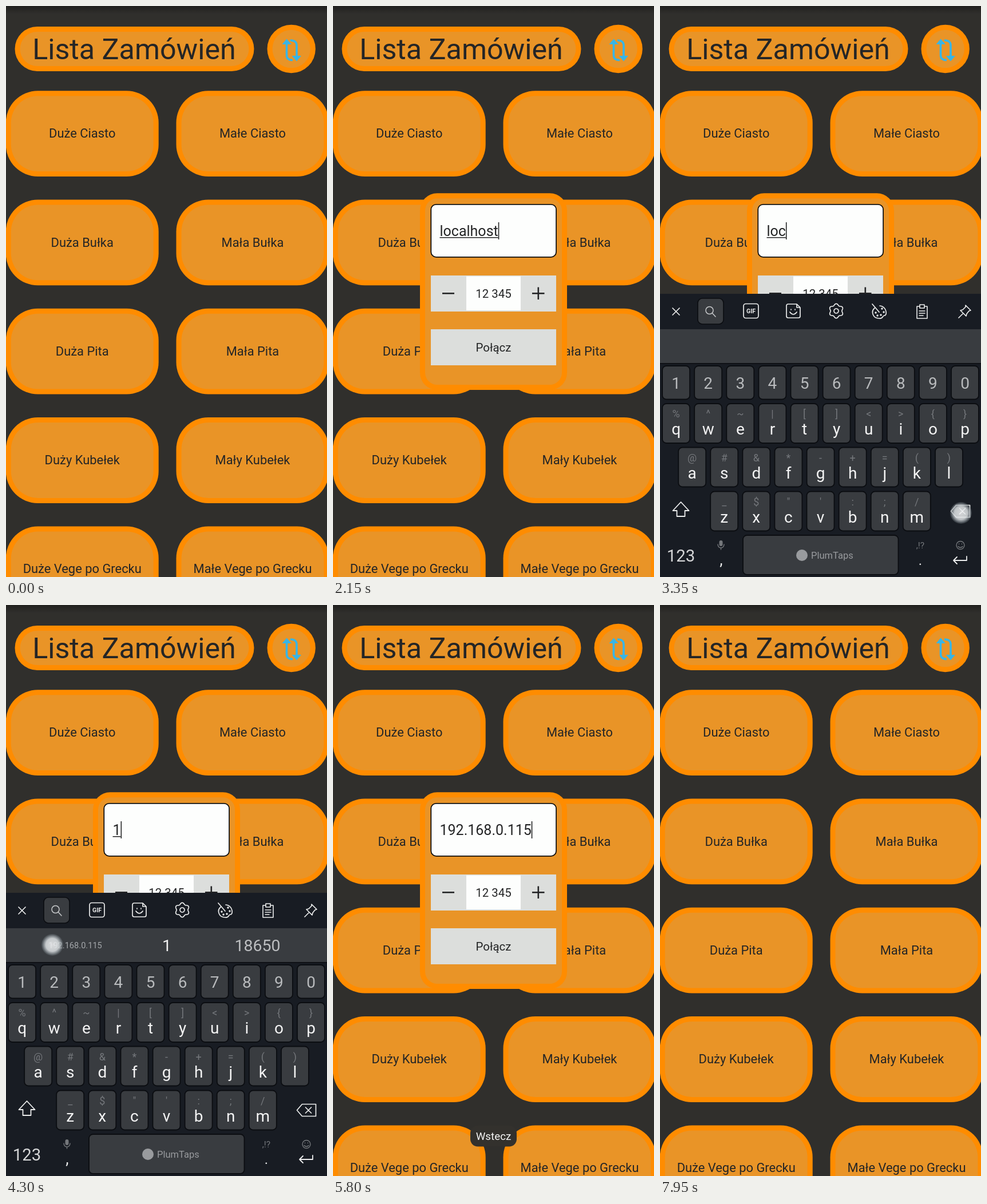
An HTML page with a canvas that plays this animation: 561x998 px, repeating every 8000 ms.

```html
<!DOCTYPE html>
<html lang="pl">
<head>
<meta charset="utf-8">
<style>
html, body { margin: 0; width: 100%; height: 100%; overflow: hidden; background: #302f2c; }
canvas { display: block; width: 100%; height: 100%; }
</style>
</head>
<body>
<canvas id="stage" width="561" height="998"></canvas>
<script>
const W = 561, H = 998, LOOP = 8000, STEP = 50;
const ctx = document.getElementById('stage').getContext('2d');
const INK = '#242526', KEY = '#393c40', EDGE = '#0b0d11', PALE = '#eceded', DIM = '#74777b';

const OPEN = 750, FOCUS = 2050, KB_IN = 2200, KB_OUT = 5600, CLOSE = 6950;
const PICK = 4400, TYPED = 3850;
const TOAST_IN = 5400, TOAST_OUT = 6200;

// start, end, from x, from y, to x, to y, opacity
const touches = [
  [550, 700, 498, 75, 498, 75, .85],
  [1950, 2100, 262, 394, 262, 394, .85],
  [2750, 3600, 526, 886, 526, 886, .85],
  [3750, 3900, 29, 660, 29, 660, .85],
  [4200, 4350, 81, 594, 81, 594, .85],
  [5150, 5400, 557, 886, 498, 886, .5],
  [6750, 6900, 281, 597, 281, 597, .85]
];

function box(x, y, w, h, r, fill, stroke, lw = 2) {
  ctx.beginPath();
  ctx.roundRect(x, y, w, h, r);
  if (fill) { ctx.fillStyle = fill; ctx.fill(); }
  if (stroke) { ctx.strokeStyle = stroke; ctx.lineWidth = lw; ctx.stroke(); }
}

function text(s, x, y, size, color, align = 'center', weight = 400) {
  ctx.font = `${weight} ${size}px Roboto, sans-serif`;
  ctx.textAlign = align;
  ctx.fillStyle = color;
  ctx.fillText(s, x, y);
}

function icon(path, x, y, color = PALE, lw = 1.7) {
  ctx.save();
  ctx.translate(x, y);
  ctx.strokeStyle = color;
  ctx.lineWidth = lw;
  ctx.lineCap = ctx.lineJoin = 'round';
  ctx.stroke(new Path2D(path));
  ctx.restore();
}

function dot(x, y, r, color) {
  ctx.beginPath();
  ctx.arc(x, y, r, 0, 7);
  ctx.fillStyle = color;
  ctx.fill();
}

function panel(x, y, w, h, r) {
  box(x, y, w, h, r, '#ff8c00');
  box(x + 9, y + 9, w - 18, h - 18, r - 9, '#e99427');
}

function drawList() {
  ctx.fillStyle = '#302f2c';
  ctx.fillRect(0, 0, W, H);
  const shade = ctx.createLinearGradient(0, 0, 0, 14);
  shade.addColorStop(0, 'rgba(0,0,0,.3)');
  shade.addColorStop(1, 'rgba(0,0,0,0)');
  ctx.fillStyle = shade;
  ctx.fillRect(0, 0, W, 14);

  panel(15.5, 36, 418, 78, 39);
  text('Lista Zamówień', 224, 93, 50.2, INK);
  panel(456.5, 32.8, 84.4, 84.4, 42.2);
  drawSwap();

  const items = ['Ciasto', 'Bułka', 'Pita', 'Kubełek', 'Vege po Grecku'];
  const sizes = [['Duże', 'Małe'], ['Duża', 'Mała'], ['Duża', 'Mała'], ['Duży', 'Mały'], ['Duże', 'Małe']];
  items.forEach((item, row) => sizes[row].forEach((size, col) => {
    const x = col * 297.8, y = 148.2 + row * 190.3;
    panel(x - .3, y, 267, 149.8, 56);
    text(`${size} ${item}`, x + 133.2, y + 82, 21.9, INK);
  }));
}

function drawSwap() {
  ctx.save();
  ctx.strokeStyle = ctx.fillStyle = '#38b5e6';
  ctx.lineWidth = 3.6;
  ctx.stroke(new Path2D('M490.5 64V86Q490.5 94.5 501 94.5M497 60Q508 60 508 69V90'));
  ctx.fill(new Path2D('M482.5 67L490.5 57.5L499 67ZM499.5 87L508 96.5L516 87Z'));
  ctx.restore();
}

function fieldText(t) {
  if (t >= PICK) return '192.168.0.115';
  if (t >= TYPED) return '1';
  const gone = t < 2800 ? 0 : t < 3100 ? 1 : 2 + Math.floor((t - 3100) / 60);
  return 'localhost'.slice(0, Math.max(0, 9 - gone));
}

function drawDialog(t) {
  panel(152, 327.3, 257, 343.7, 30);
  box(171.3, 346.8, 218.8, 92, 9, '#fdfefd', '#111', 1.8);

  const s = fieldText(t), x = 186.5;
  text(s, x, 402, 25, INK, 'left');
  const w = ctx.measureText(s).width;
  ctx.fillStyle = INK;
  if (t >= FOCUS) {
    ctx.fillRect(x + w, 378, 1.6, 30);
    if (t < KB_OUT) ctx.fillRect(x, 404, w, 1.5);
  }

  box(171, 471, 219, 63, 0, '#dcdedc');
  box(233, 472.5, 95, 59.5, 0, '#fdfefd');
  ctx.fillStyle = INK;
  ctx.fillRect(191, 501, 21, 2.6);
  ctx.fillRect(348, 501, 21.5, 2.6);
  ctx.fillRect(357.5, 491.5, 2.6, 21.5);
  text('12 345', 280.5, 510, 20.4, INK);

  const pressed = t >= 6750 && t < 6900;
  box(171, 565, 219, 63, 0, pressed ? '#c8cac8' : '#dcdedc');
  text('Połącz', 280.5, 603.5, 20.4, INK);
}

function drawToolbar() {
  box(66, 511, 45, 45, 8, KEY, EDGE, 1.6);
  icon('M-6 -6L6 6M6 -6L-6 6', 28, 534);
  icon('M5 -2A6.5 6.5 0 1 1 -8 -2A6.5 6.5 0 1 1 5 -2M3.5 3L9 9', 88, 534, '#c6c8ca', 1.5);
  box(146, 520.5, 26, 25, 4, null, PALE, 1.7);
  text('GIF', 159, 537, 10.5, PALE, 'center', 700);
  icon('M-9 -12H6L12 -6V9Q12 12 9 12H-9Q-12 12 -12 9V-9Q-12 -12 -9 -12M6 -12V-6H12M-6 2Q0 10 6 2M-4 -3V-2M3 -3V-2', 233, 533);
  let gear = '';
  for (let i = 0; i <= 72; i++) {
    const a = i * Math.PI / 36, r = 11.3 - 1.4 * Math.cos(a * 6);
    gear += `${i ? 'L' : 'M'}${r * Math.cos(a)} ${r * Math.sin(a)}`;
  }
  icon(gear + 'M4 0A4 4 0 1 1 -4 0A4 4 0 1 1 4 0', 308, 533);
  icon('M-8 -6C-15 0 -11 12 0 12C8 13 5 7 9 7C15 7 13 -9 1 -10M-12 -13L0 1', 383, 534);
  [[-6, 2], [-3, 7], [3, 6], [5, -5], [8, 1]].forEach(([x, y]) => dot(383 + x, 534 + y, 1.7, PALE));
  icon('M-4 -9H-9V12H9V-9H4M-4 -12H4V-6H-4ZM-5 -1H5M-5 3H5M-5 7H2', 458, 534, PALE, 1.6);
  icon('M2 -11L11 -2L8 -1L4 4L3 8L-7 -2L-3 -3L2 -8ZM-2 3L-10 11', 532, 534);
}

function drawSuggestions(t) {
  if (t >= PICK) {
    text('192.168.0.15', 121, 600, 15.7, '#a5a8ab');
    text('192.168.0.115', 281, 602, 20.6, '#f2f2f2');
  } else if (t >= TYPED) {
    text('192.168.0.115', 121, 600, 14.6, '#a5a8ab');
    text('1', 281, 605, 28.5, '#f2f2f2');
    text('18650', 439.5, 605, 28.5, '#bcbec0');
  }
}

function key(x, y, w, h) {
  box(x, y, w, h, 7, KEY, EDGE, 1.8);
}

function drawKeys(t) {
  const pressed = t >= 3750 && t < 3900;
  const pitch = 56.1;
  [...'1234567890'].forEach((c, i) => {
    const x = 28.1 + i * pitch;
    key(x - 24, 629, 48, 58.5);
    if (pressed && !i) box(x - 23, 630, 46, 56.5, 6, '#54575b');
    text(c, x, 668.5, 28, '#b9bbbd');
  });
  const rows = [
    ['qwertyuiop', '%^~|[]<>{}', 28.1, 695],
    ['asdfghjkl', '@#&*-+=()', 56.2, 771.5],
    ['zxcvbnm', '_$"\':;/', 112.2, 848.5]
  ];
  for (const [letters, hints, x0, y] of rows) {
    [...letters].forEach((c, i) => {
      const x = x0 + i * pitch;
      key(x - 24, y, 48, 69);
      text(hints[i], x, y + 24, 18, DIM);
      text(c, x, y + 54, 28, '#f4f4f4');
    });
  }

  icon('M0 -13L14 2H7V12H-7V2H-14Z', 36.5, 880, PALE, 1.8);
  icon('M-17 0L-8 -10.5H16V10.5H-8ZM-2 -5L8 5M8 -5L-2 5', 525.5, 883, PALE, 1.7);

  text('123', 36.5, 970.5, 29.3, '#d5d6d7');
  text(',', 107, 977, 27, PALE);
  text('.', 455, 977, 24, PALE);
  text(',!?', 455, 948, 15.5, DIM);
  box(103.5, 934, 6, 10, 3, DIM);
  icon('M-5.5 -1Q-5 5 0 5Q5 5 5.5 -1M0 5V8', 106.5, 942, DIM, 1.4);
  icon('M7 0A7 7 0 1 1 -7 0A7 7 0 1 1 7 0M-4 2Q0 6 4 2M-2.5 -2.5V-2M2.5 -2.5V-2', 525, 942.5, DIM, 1.4);
  icon('M12 -6V1H-11M-5 -5L-11 1L-5 7', 524, 968, PALE, 1.8);

  key(145, 925, 271.5, 69);
  dot(248, 960, 10, '#999b9e');
  text('PlumTaps', 264, 965.5, 16.5, '#999b9e', 'left');
}

function drawKeyboard(t) {
  const rise = Math.min(1, (t - KB_IN) / 200);
  const fall = Math.max(0, (t - KB_OUT) / 200);
  ctx.save();
  ctx.translate(0, Math.round(495 * (Math.pow(1 - rise, 3.5) + fall * fall)));
  box(0, 503, W, 500, 0, '#181c23');
  box(0, 565, W, 60, 0, KEY);
  ctx.fillStyle = EDGE;
  ctx.fillRect(0, 624, W, 1.5);
  drawToolbar();
  drawSuggestions(t);
  drawKeys(t);
  ctx.restore();
}

function drawToast(t) {
  ctx.save();
  ctx.globalAlpha = Math.min(1, (t - TOAST_IN + 50) / 150, (TOAST_OUT - t) / 200);
  box(240, 910, 81, 36.5, 13, '#33312d');
  text('Wstecz', 280.5, 934.5, 18.8, '#f5f5f5');
  ctx.restore();
}

function drawTouch(t) {
  for (const [a, b, x0, y0, x1, y1, alpha] of touches) {
    if (t < a || t > b) continue;
    const p = (t - a) / (b - a);
    const x = x0 + (x1 - x0) * p, y = y0 + (y1 - y0) * p;
    const glow = ctx.createRadialGradient(x, y, 0, x, y, 19);
    glow.addColorStop(0, `rgba(245,246,247,${alpha})`);
    glow.addColorStop(.6, `rgba(222,226,228,${alpha})`);
    glow.addColorStop(.8, `rgba(165,172,177,${alpha * .8})`);
    glow.addColorStop(1, `rgba(110,120,126,${alpha * .3})`);
    dot(x, y, 19, glow);
  }
}

function draw(t) {
  drawList();
  if (t >= OPEN && t < CLOSE) drawDialog(t);
  if (t >= KB_IN && t < KB_OUT + 200) drawKeyboard(t);
  if (t >= TOAST_IN && t < TOAST_OUT) drawToast(t);
  drawTouch(t);
}

function tick() {
  draw(Math.floor(performance.now() % LOOP / STEP) * STEP);
  requestAnimationFrame(tick);
}
tick();
</script>
</body>
</html>
```
